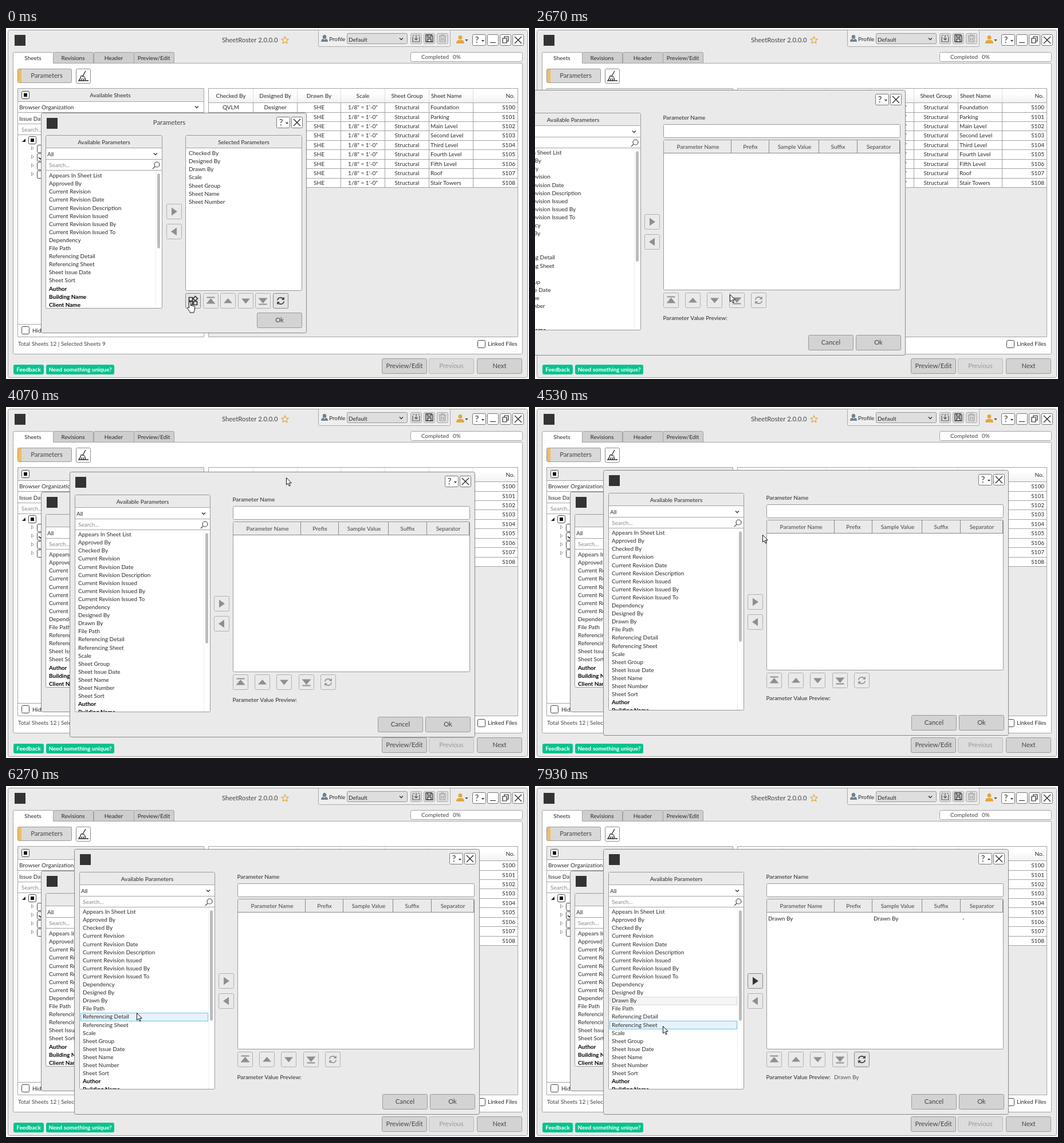
An HTML page with a canvas that plays this animation: 913x613 px, repeating every 8000 ms.

```html
<!DOCTYPE html>
<html lang="en">
<head>
<meta charset="utf-8">
<title>Sheet parameters</title>
<style>
html, body { margin: 0; width: 100%; height: 100%; overflow: hidden; background: #fff; }
canvas { display: block; }
</style>
</head>
<body>
<canvas id="stage" width="913" height="613"></canvas>
<script>
const ctx = document.getElementById('stage').getContext('2d');
const LOOP = 8000, TICK = 1000 / 15;
const INK = '#2a2a2a', GREY = '#8f8f8f', PANEL = '#eaeaea', LINE = '#a3a3a3', BUTTON = '#d3d3d3', ORANGE = '#e5a53a';

// Pointer path: tick, x, y
const PATH = [
  [7, 321, 478], [8, 320, 477], [11, 320, 477], [12, 322, 477], [17, 322, 477], [18, 324, 483],
  [23, 324, 483], [24, 323, 477], [26, 323, 477], [29, 325, 469], [39, 326, 469], [40, 340, 465],
  [44, 338, 280], [48, 320, 128], [50, 317, 118], [51, 323, 120], [52, 350, 123], [53, 385, 125],
  [54, 433, 126], [57, 475, 125], [60, 489, 123], [61, 489, 123], [64, 497, 120], [65, 497, 120],
  [66, 478, 138], [68, 397, 223], [72, 262, 266], [78, 228, 240], [83, 227, 229], [84, 227, 229],
  [88, 230, 290], [92, 229, 396], [95, 228, 396], [97, 228, 377], [98, 228, 376], [101, 228, 376],
  [109, 388, 343], [112, 393, 345], [114, 388, 346], [117, 260, 405], [119, 223, 419]
];
const GRAB = [377, 10];

const SHORT_LIST = ['Appears In Sheet List', 'Approved By', 'Current Revision', 'Current Revision Date',
  'Current Revision Description', 'Current Revision Issued', 'Current Revision Issued By',
  'Current Revision Issued To', 'Dependency', 'File Path', 'Referencing Detail', 'Referencing Sheet',
  'Sheet Issue Date', 'Sheet Sort'];
const CHOSEN = ['Checked By', 'Designed By', 'Drawn By', 'Scale', 'Sheet Group', 'Sheet Name', 'Sheet Number'];
const FULL_LIST = [...SHORT_LIST, ...CHOSEN].sort();
const BOLD_LIST = ['Author', 'Building Name', 'Client Name'];
const LEVELS = ['Foundation', 'Parking', 'Main Level', 'Second Level', 'Third Level', 'Fourth Level',
  'Fifth Level', 'Roof', 'Stair Towers'];
const LIST_TOP = 212.5, ROW = 14.1;

function text(str, x, y, { size = 10, align = 'left', color = INK, weight = 400 } = {}) {
  ctx.font = `${weight} ${size}px Lato, sans-serif`;
  ctx.textAlign = align;
  ctx.fillStyle = color;
  ctx.fillText(str, x, y + size * 0.36);
}
const centered = (str, x, y, opts) => text(str, x, y, { align: 'center', ...opts });

// Rectangle given by its corners
function box(x0, y0, x1, y1, fill, stroke = LINE, radius = 0) {
  ctx.beginPath();
  ctx.roundRect(x0 + 0.5, y0 + 0.5, x1 - x0 - 1, y1 - y0 - 1, radius);
  if (fill) { ctx.fillStyle = fill; ctx.fill(); }
  if (stroke) { ctx.strokeStyle = stroke; ctx.lineWidth = 1; ctx.stroke(); }
}

function fill(x, y, w, h, color) {
  ctx.fillStyle = color;
  ctx.fillRect(x, y, w, h);
}

function path(d, x, y, { stroke, fill, width = 1 }) {
  const p = new Path2D(d);
  ctx.save();
  ctx.translate(x, y);
  if (fill) { ctx.fillStyle = fill; ctx.fill(p); }
  if (stroke) { ctx.strokeStyle = stroke; ctx.lineWidth = width; ctx.stroke(p); }
  ctx.restore();
}

const chevron = (x, y) => path('M-3 -1.5L0 1.5L3 -1.5', x, y, { stroke: '#333', width: 1.4 });
const smallArrow = (x, y) => path('M-2.5 -1H2.5L0 2Z', x, y, { fill: '#333' });
const hLine = (x0, x1, y, color = LINE) => fill(x0, y, x1 - x0, 1, color);
const vLine = (x, y0, y1, color = LINE) => fill(x, y0, 1, y1 - y0, color);
const logo = (x, y) => fill(x, y, 19, 19, '#333');

function button(label, x, y, disabled) {
  box(x, y, x + 79, y + 27, disabled ? '#dcdcdc' : BUTTON, disabled ? '#bbb' : '#999', 2);
  centered(label, x + 39.5, y + 13, { size: 11.3, color: disabled ? '#999' : '#444' });
}

function checkbox(x, y, state) {
  box(x, y, x + 14, y + 14, '#fff', '#444', 2);
  if (state === 'some') fill(x + 4, y + 4, 6, 6, '#111');
  if (state === 'on') path('M3 7L6 10L11 4', x, y, { stroke: '#111', width: 1.4 });
}

const ICONS = {
  top: { fill: 'M-7 -7H7V-5H-7ZM0 -4.5L8 5H-8Z' },
  up: { fill: 'M0 -4.5L7.5 4H-7.5Z' },
  down: { fill: 'M0 5L7.5 -4H-7.5Z' },
  bottom: { fill: 'M-7 7H7V5H-7ZM0 4.5L8 -5H-8Z' },
  right: { fill: 'M-4.5 -7V7L5.5 0Z' },
  left: { fill: 'M4.5 -7V7L-5.5 0Z' },
  refresh: { stroke: 'M-5.5 -1A5.5 5 0 0 1 4.5 -3.5M5.5 -6V-2.5H2M5.5 1A5.5 5 0 0 1 -4.5 3.5M-5.5 6V2.5H-2' },
  combine: { stroke: 'M-7 -6H-1V0H-7ZM-7 1H-1V7H-7ZM1 1H7V7H1ZM4 -8L8 -4L4 0L0 -4Z' }
};

function iconButton(kind, x, y, enabled = false) {
  box(x, y, x + 27, y + 27, enabled ? '#e4e4e4' : PANEL, enabled ? '#888' : '#b0b0b0', 2);
  const color = enabled ? '#333' : GREY, icon = ICONS[kind];
  path(icon.fill || icon.stroke, x + 13.5, y + 13.5,
    icon.fill ? { fill: color } : { stroke: color, width: 1.7 });
}

function helpButton(x, y) {
  box(x, y, x + 24, y + 20, '#fff', '#777', 2);
  centered('?', x + 8, y + 10, { size: 15, color: '#333' });
  smallArrow(x + 18.5, y + 11);
}

function closeButton(x, y) {
  box(x, y, x + 20, y + 20, '#fff', '#777', 2);
  path('M4 4L16 16M16 4L4 16', x, y, { stroke: '#222', width: 1.3 });
}

function drawTopBar() {
  logo(15, 12);
  text('SheetRoster 2.0.0.0', 377, 21, { size: 11.3, color: '#444' });
  path('M0 -6L1.8 -2L6 -1.6L2.9 1.3L3.8 5.6L0 3.4L-3.8 5.6L-2.9 1.3L-6 -1.6L-1.8 -2Z', 487, 21, { stroke: ORANGE, width: 1.2 });
  box(545, 3, 776, 33, '#efefef', '#aaa', 2);
  path('M0 -6A3 3.2 0 0 1 0 1A3 3.2 0 0 1 0 -6M-6 6Q-6 1 -2 1L0 3L2 1Q6 1 6 6Z', 556, 18, { fill: '#70808d' });
  text('Profile', 564, 19);
  box(595, 9, 701, 28, '#dedede', '#999', 2);
  text('Default', 598, 20);
  chevron(690, 19);
  [706, 729, 752].forEach(x => box(x, 9, x + 20, 28, '#dcdcdc', '#aaa', 2));
  path('M-6 -3V6H6V-3M-6 -5H-3M3 -5H6M0 -6V3M-3 0L0 3L3 0', 716, 18, { stroke: '#555', width: 1.2 });
  path('M-6 -6H4L6 -4V6H-6ZM-3 -6V-2H3V-6M-3 6V1H3V6', 739, 18, { stroke: '#333', width: 1.3 });
  path('M-6 -4H6M-2 -4V-6H2V-4M-4.5 -4V6H4.5V-4M-1.5 -1V4M1.5 -1V4', 762, 18, { stroke: '#999', width: 1.2 });
  path('M0 -7A3.5 3.5 0 0 1 0 0A3.5 3.5 0 0 1 0 -7M-7 7Q-7 1 -2 1H2Q7 1 7 7Z', 793, 20, { fill: ORANGE });
  smallArrow(804, 21);
  helpButton(814, 11);
  box(840, 11, 860, 31, '#fff', '#777', 2);
  hLine(845, 855, 25, '#222');
  box(862, 11, 882, 31, '#fff', '#777', 2);
  path('M5 7H12V15H5ZM8 7V4H15V12H12', 862, 11, { stroke: '#222', width: 1.2 });
  closeButton(884, 11);
}

function drawSheetTree() {
  box(20, 105, 346, 540, '#fff');
  fill(21, 106, 324, 22, PANEL);
  [128, 147, 167, 186, 517].forEach(y => hLine(20, 346, y));
  checkbox(27, 110, 'some');
  centered('Available Sheets', 182, 117);
  text('Browser Organization', 23, 138.5);
  chevron(333, 138);
  text('Issue Date', 23, 158);
  text('Search...', 27, 177, { color: '#888' });
  path('M3 -3V3H-3Z', 31, 196, { fill: '#222' });
  checkbox(39, 189, 'some');
  [210, 225, 240, 255].forEach((y, i) => {
    path('M-2 -3L2 0L-2 3Z', 46.5, y, { stroke: '#999' });
    checkbox(54, y - 6, i === 1 ? 'on' : 'off');
  });
  checkbox(27, 521);
  text('Hide', 46, 528);
}

function drawSheetTable() {
  const cols = [353, 431, 508, 584, 661, 738, 815, 892];
  const heads = ['Checked By', 'Designed By', 'Drawn By', 'Scale', 'Sheet Group'];
  const values = ['QVLM', 'Designer', 'SHE', '1/8" = 1\'-0"', 'Structural'];
  const mid = i => (cols[i] + cols[i + 1]) / 2 + 0.5;
  box(353, 105, 894, 540, PANEL);
  fill(354, 106, 539, 172, '#fff');
  const shade = ctx.createLinearGradient(0, 106, 0, 130);
  shade.addColorStop(0.3, '#fff');
  shade.addColorStop(1, '#f1f2f4');
  fill(354, 106, 539, 24, shade);
  heads.forEach((h, i) => centered(h, mid(i), 118));
  text('Sheet Name', 742, 118);
  text('No.', 888, 118, { align: 'right' });
  LEVELS.forEach((level, r) => {
    const y = 138.5 + r * 16.44;
    values.forEach((v, i) => centered(v, mid(i), y));
    text(level, 741, y);
    text('S10' + r, 889, y, { align: 'right' });
  });
  for (let r = 0; r <= 9; r++) hLine(353, 893, Math.floor(130.6 + r * 16.44));
  cols.slice(1, -1).forEach(x => {
    vLine(x, 106, 130, '#ddd');
    vLine(x, 130, 278);
  });
}

function drawWindow() {
  fill(0, 0, 913, 613, '#fff');
  box(3, 3, 911, 611, PANEL, '#999', 3);
  drawTopBar();
  box(12, 61, 902, 570, '#fff', LINE, 2);
  ['Sheets', 'Revisions', 'Header', 'Preview/Edit'].forEach((name, i) => {
    const x = 12 + i * 70.5 | 0;
    box(x, 42, x + 71, 62, i ? '#cecece' : '#fff', LINE, [2, 2, 0, 0]);
    if (!i) fill(x + 1, 60, 69, 3, '#fff');
    centered(name, x + 35, 52);
  });
  box(706, 42, 902, 59, '#fff', LINE, 3);
  text('Completed', 725, 50, { color: '#444' });
  text('0%', 780, 50, { color: '#444' });

  box(20, 71, 115, 96, '#d9d9d9', '#999', 2);
  fill(21, 72, 6, 23, '#efbd62');
  centered('Parameters', 71, 83, { size: 11.2, color: '#444' });
  box(122, 71, 148, 97, '#fff', '#888', 2);
  path('M4 -9L-1 0M-4 -1L3 2M-4 0Q-5 5 -8 8H4L3 3M-4 8L-2 4M0 8L1 4M5 8H9', 135, 84, { stroke: '#222', width: 1.3 });

  drawSheetTree();
  drawSheetTable();
  text('Total Sheets 12 | Selected Sheets 9', 21, 551, { color: '#444' });
  checkbox(823, 545);
  text('Linked Files', 841, 551);
  button('Preview/Edit', 656, 577);
  button('Previous', 738, 577, true);
  button('Next', 822, 577);
  [['Feedback', 13, 66], ['Need something unique?', 70, 189]].forEach(([label, x0, x1]) => {
    box(x0, 588, x1, 605, '#05c38e', '#05c38e', 2);
    centered(label, (x0 + x1) / 2, 596, { color: '#fff', weight: 700 });
  });
}

function dialogFrame(x0, y0, x1, y1) {
  box(x0, y0, x1, y1, PANEL, '#888', 3);
  logo(x0 + 10, y0 + 9);
  helpButton(x1 - 53, y0 + 7);
  closeButton(x1 - 27, y0 + 7);
}

function titledList(title, x0, y0, x1, y1) {
  box(x0, y0, x1, y1, '#fff', '#999', 2);
  fill(x0 + 1, y0 + 1, x1 - x0 - 2, 22, PANEL);
  hLine(x0, x1, y0 + 22);
  centered(title, (x0 + x1) / 2, y0 + 12);
}

function listItems(names, x, y, weight) {
  names.forEach((name, i) => text(name, x, y + i * ROW, { weight, color: weight ? '#000' : INK }));
}

// Parameter picker: title, filter, search and list with a scroll thumb
function parameterList(names, x0, y0, x1, y1, firstY, thumb, highlights = () => {}) {
  titledList('Available Parameters', x0, y0, x1, y1);
  text('All', x0 + 3, y0 + 33);
  chevron(x1 - 12, y0 + 33);
  hLine(x0, x1, y0 + 42);
  text('Search...', x0 + 6, y0 + 52, { color: '#888' });
  path('M1.5 -6A4.5 4.5 0 0 1 1.5 3A4.5 4.5 0 0 1 1.5 -6M-1.5 1.5L-6 6', x1 - 11, y0 + 53, { stroke: '#444', width: 1.2 });
  hLine(x0, x1, y0 + 61);
  vLine(x1 - 12, y0 + 62, y1 - 1, '#eee');
  box(x1 - 9, y0 + 67, x1 - 4, y0 + 67 + thumb, '#bcbcbc', '#bcbcbc', 2);
  ctx.save();
  ctx.beginPath();
  ctx.rect(x0 + 1, y0 + 62, x1 - x0 - 2, y1 - y0 - 63);
  ctx.clip();
  highlights();
  listItems(names, x0 + 6, firstY);
  listItems(BOLD_LIST, x0 + 6, firstY + names.length * ROW, 700);
  ctx.restore();
}

function drawPicker() {
  dialogFrame(61, 148, 525, 533);
  centered('Parameters', 285, 165, { size: 11.4, color: '#444' });
  parameterList(SHORT_LIST, 69, 187, 273, 490, 257.5, 131);
  iconButton('right', 280, 307);
  iconButton('left', 280, 342);
  titledList('Selected Parameters', 313, 187, 517, 459);
  listItems(CHOSEN, 319, 218.5);
  ['combine', 'top', 'up', 'down', 'bottom', 'refresh'].forEach((kind, i) =>
    iconButton(kind, Math.round(313 + i * 30.5), 463, i % 5 === 0));
  button('Ok', 438, 497);
}

function drawTooltip(alpha) {
  ctx.globalAlpha = alpha;
  box(321, 496, 516, 511, '#fff', '#999');
  text('Combine available parameters into one', 326, 503);
  ctx.globalAlpha = 1;
}

// Drawn at its resting place; the caller shifts it while dragged
function drawCombiner(hovered, selected, focused, added) {
  dialogFrame(119, 110, 827, 574);
  const row = (i, color, edge) => {
    const y = Math.round(LIST_TOP + i * ROW);
    box(130, y, 353, y + 15, color, edge);
  };
  parameterList(FULL_LIST, 128, 150, 365, 530, 219.5, 193, () => {
    if (selected) focused ? row(11, '#cbe8f6', '#26a0da') : row(11, '#f5f5f5', '#dadada');
    if (hovered >= 0 && !(selected && hovered === 11)) row(hovered, '#e5f3fb', '#70c0e7');
  });
  iconButton('right', 371, 327, selected);
  iconButton('left', 371, 362);
  text('Parameter Name', 403.5, 158.5);
  box(404, 170, 818, 194, '#fff', '#999', 2);
  box(404, 197, 818, 460, '#fff', '#999', 2);
  fill(405, 198, 412, 22, PANEL);
  hLine(404, 818, 220, '#888');
  [522, 588, 675, 742, 816].forEach(x => vLine(x, 198, 220, '#888'));
  [['Parameter Name', 464.5], ['Prefix', 556], ['Sample Value', 633], ['Suffix', 709], ['Separator', 780]]
    .forEach(([label, x]) => centered(label, x, 209.5, { color: '#444' }));
  ['top', 'up', 'down', 'bottom', 'refresh'].forEach((kind, i) =>
    iconButton(kind, Math.round(403.5 + i * 38.4), 464, added && i === 4));
  text('Parameter Value Preview:', 403.5, 508);
  if (added) {
    text('Drawn By', 407, 231);
    text('Drawn By', 591, 231);
    text('-', 746, 231);
    text('Drawn By', 522, 508, { color: '#555' });
  }
  button('Cancel', 657, 538);
  button('Ok', 740, 538);
}

function pointerAt(tick) {
  const i = PATH.findIndex(k => k[0] > tick);
  if (i < 0) return PATH.at(-1).slice(1);
  if (i === 0) return PATH[0].slice(1);
  const [t0, x0, y0] = PATH[i - 1], [t1, x1, y1] = PATH[i];
  const f = (tick - t0) / (t1 - t0);
  return [x0 + (x1 - x0) * f, y0 + (y1 - y0) * f].map(Math.round);
}

function drawPointer(x, y, hand) {
  const d = hand
    ? 'M-1.5 10V1.5Q0 -1 1.5 1.5V7Q3 5.5 4 7.5Q5.5 6 6.5 8Q8.5 7 8.5 9.5V13Q8.5 15 7 17V19H0V17.5L-4.5 11.5Q-4.5 8.5 -1.5 11Z'
    : 'M0.5 0.5V13L3.3 10.3L5.3 15L7.3 14.2L5.3 9.6H9.2Z';
  path(d, x, y, { fill: '#fff', stroke: '#111' });
}

function draw(time) {
  const tick = Math.floor((time % LOOP + 5) / TICK);
  const [x, y] = pointerAt(tick);
  drawWindow();
  drawPicker();
  if (tick >= 10 && tick < 29) drawTooltip(Math.min(1, (tick - 9) / 3, (29 - tick) / 2));
  if (tick >= 31) {
    // The window follows the pointer one tick late
    const [gx, gy] = pointerAt(Math.min(65, Math.max(50, tick - 1)));
    const overList = tick > 65 && x >= 130 && x < 353 && y > LIST_TOP;
    const hovered = overList ? Math.floor((y - LIST_TOP) / ROW) : -1;
    ctx.save();
    ctx.translate(gx - GRAB[0] - 120, gy - GRAB[1] - 110);
    drawCombiner(hovered, tick >= 100, tick < 113, tick >= 113);
    ctx.restore();
  }
  drawPointer(x, y, tick < 31 || (tick >= 100 && x > 371 && x < 397));
}

const start = performance.now();
function frame() {
  draw(performance.now() - start);
  requestAnimationFrame(frame);
}
frame();
</script>
</body>
</html>
```
